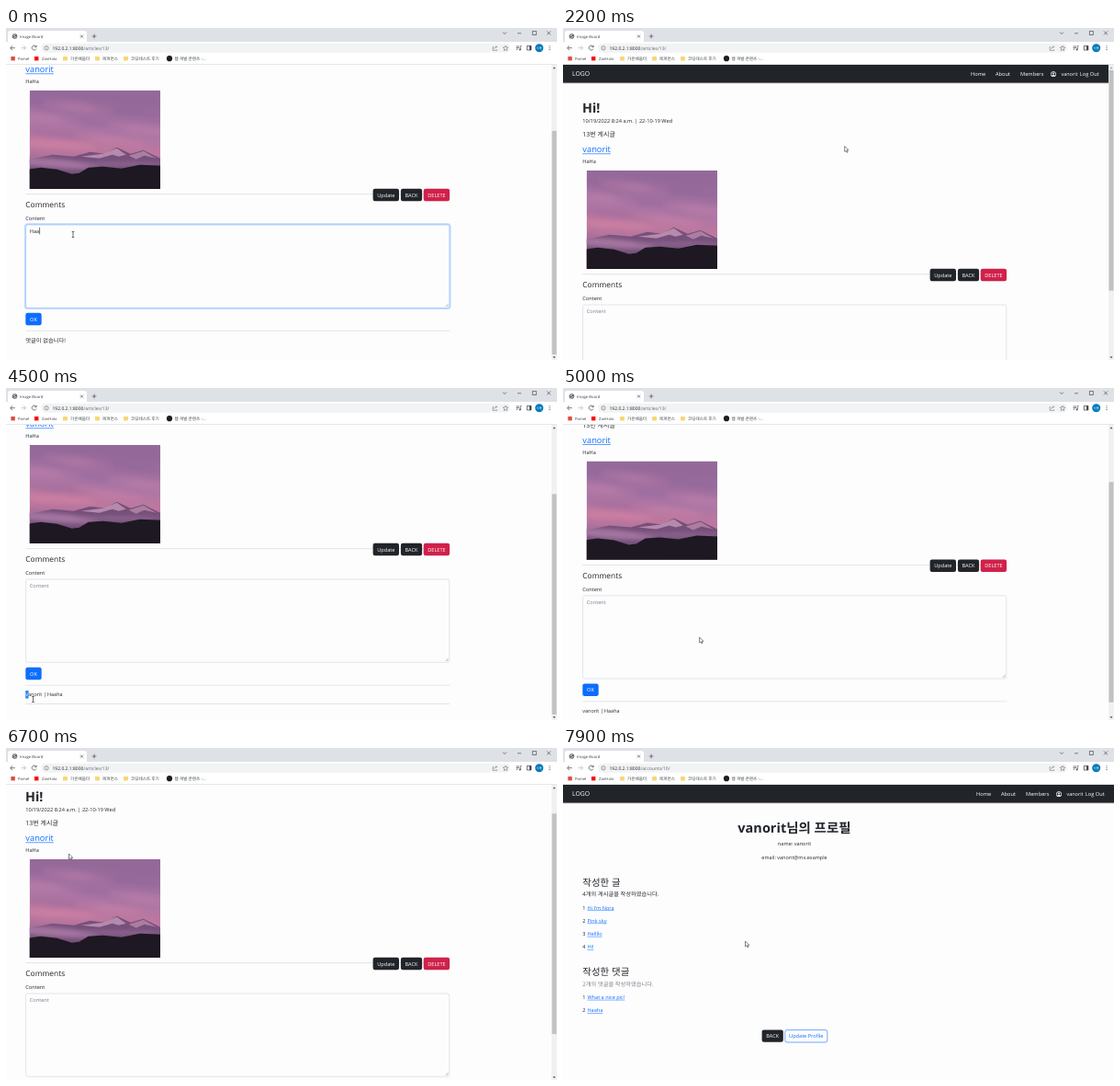
Write an HTML page with a canvas that moves like this. It is 600 by 361 pixels and loops after 8 s.

```html
<!DOCTYPE html>
<html lang="ko">
<head>
<meta charset="utf-8">
<title>Image Board</title>
<style>
  html, body { margin: 0; width: 100%; height: 100%; overflow: hidden; background: #fdfdfe; }
  canvas { display: block; width: 600px; height: 361px; }
</style>
</head>
<body>
<canvas id="stage"></canvas>
<script>
const LOOP = 8000, STEP = 100, TOP = 40, BOTTOM = 361;
const USER = 'vanorit', HOST = '192.0.2.1:8000';
const INK = '#212529', BLUE = '#0d6efd', RED = '#d0214a', RULE = '#d9dadc', GREY = '#5f6368';
const FONT = '"Open Sans", "Noto Sans CJK KR", "Noto Sans CJK", sans-serif';

const canvas = document.getElementById('stage');
const c = canvas.getContext('2d');
const ratio = window.devicePixelRatio || 1;
canvas.width = 600 * ratio;
canvas.height = 361 * ratio;

// Keys: time, then the values that hold at that time
const MOUSE = [
  [0, 73, 224.5], [800, 73, 224.5], [1400, 30, 316], [1700, 30, 316], [2200, 306.7, 128.5],
  [2400, 306.7, 128.5], [2800, 275.5, 296], [3400, 275.5, 296], [4300, 22, 334], [4500, 29.5, 338.5],
  [4700, 29.5, 338.5], [5200, 228, 226], [5500, 218, 205], [5700, 218, 205], [6700, 68.5, 115],
  [7000, 42, 131], [7500, 38, 131], [7900, 198.5, 210]
];
const SCROLL = [
  [0, 87], [1700, 87], [1800, 0], [2300, 0], [2500, 37], [2800, 93], [4800, 93], [5200, 57.5],
  [6400, 57.5], [6700, 34], [7000, 0]
];
const POINTER = [[0, 'beam'], [1200, 'arrow'], [1300, 'hand'], [1800, 'arrow'], [2600, 'beam'],
  [4800, 'arrow'], [7000, 'hand'], [7600, 'arrow']];

function at(keys, t) {
  const i = keys.findIndex(k => k[0] > t);
  if (i < 0) return keys[keys.length - 1].slice(1);
  const [a, b] = [keys[i - 1], keys[i]];
  const p = (t - a[0]) / (b[0] - a[0]);
  return a.slice(1).map((v, n) => v + (b[n + 1] - v) * p);
}
const latest = (keys, t) => keys.filter(k => k[0] <= t).pop()[1];

function rect(x, y, w, h, fill) {
  c.fillStyle = fill;
  c.fillRect(x, y, w, h);
}
function box(x, y, w, h, r, fill, stroke, width = 0.6) {
  c.beginPath();
  c.roundRect(x, y, w, h, r);
  if (fill) { c.fillStyle = fill; c.fill(); }
  if (stroke) { c.strokeStyle = stroke; c.lineWidth = width; c.stroke(); }
}
function disc(x, y, r, fill) {
  c.beginPath();
  c.arc(x, y, r, 0, 7);
  c.fillStyle = fill;
  c.fill();
}
function ellipse(x, y, rx, ry, angle, fill) {
  c.beginPath();
  c.ellipse(x, y, rx, ry, angle, 0, 7);
  c.fillStyle = fill;
  c.fill();
}
function shape(points, fill) {
  c.beginPath();
  points.forEach(([x, y]) => c.lineTo(x, y));
  c.closePath();
  c.fillStyle = fill;
  c.fill();
}
function path(d, color, width = 0.8, x = 0, y = 0, fill) {
  c.save();
  c.translate(x, y);
  const p = new Path2D(d);
  if (fill) { c.fillStyle = fill; c.fill(p); }
  c.strokeStyle = color;
  c.lineWidth = width;
  c.stroke(p);
  c.restore();
}
// Text is laid out large and scaled down, so tiny glyphs keep exact spacing
function text(s, x, y, size = 5.7, color = INK, { weight = 400, align = 'left' } = {}) {
  const zoom = 10;
  c.save();
  c.translate(x, y);
  c.scale(1 / zoom, 1 / zoom);
  c.font = `${weight} ${size * zoom}px ${FONT}`;
  c.textRendering = 'geometricPrecision';
  c.textAlign = align;
  c.fillStyle = color;
  c.fillText(s, 0, 0);
  const width = c.measureText(s).width / zoom;
  c.restore();
  return width;
}
function link(s, x, y, size) {
  const w = text(s, x, y, size, BLUE);
  rect(x, y + size * 0.14, w, Math.max(0.5, size / 14), BLUE);
}
function button(label, x, y, w, fill, color = '#fff', border) {
  box(x, y, w, 13.4, 2.2, fill, border);
  text(label, x + w / 2, y + 8.7, 5.6, color, { align: 'center' });
}

function browser(t) {
  const loading = t >= 1600 && t < 1800;
  rect(0, 0, 600, 15, '#dee1e6');
  rect(0, 15, 600, 24, '#fff');
  rect(0, 39, 600, 0.8, '#dfe1e4');
  box(2, 3, 86, 14, [3, 3, 0, 0], '#fff');
  if (loading) {
    c.beginPath();
    c.arc(9.5, 9, 2.5, t / 90, t / 90 + 4);
    c.strokeStyle = '#1a73e8';
    c.lineWidth = 0.8;
    c.stroke();
  } else {
    disc(9.5, 9, 2.8, GREY);
    path('M-2 -1Q0 0 .5 -2M-1 2Q0 0 2 .8', '#fff', 0.8, 9.5, 9);
  }
  text('Image Board', 15, 10.7, 4.25, '#3c4043');
  path('M81 7.6l3 3m0 -3l-3 3M93.8 9h4.6m-2.3 -2.3v4.6', '#45494d', 0.7);
  path('M541 4.5l2 2l2 -2M557 5.8h4M573.4 3.5h4v4h-4zM589 3.5l4 4m0 -4l-4 4', '#333', 0.6);

  path('M9.8 21.7h-5m2.3 -2.4l-2.4 2.4l2.4 2.4', '#55595e');
  path('M16.5 21.7h5m-2.3 -2.4l2.4 2.4l-2.4 2.4', '#b9bcc0');
  path('M32.8 20.2A2.5 2.5 0 1 0 33 22.6M33.2 18.8v1.9h-1.9', '#55595e');
  box(38, 16.8, 511, 10, 5, '#f1f3f4');
  path('M46.2 21.8a2.2 2.2 0 1 0 -4.4 0a2.2 2.2 0 1 0 4.4 0M44 21.5v1.4M44 20.3v.6', GREY, 0.55);
  const w = text(HOST, 50.5, 23.5, 5, '#202124');
  text(t < 7600 ? '/articles/13/' : '/accounts/10/', 50.5 + w, 23.5, 5, GREY);
  path('M531 20.5h-.8v3.8h4.5v-1M531.8 22.5q.3 -2 2.7 -2m-1 -1.2l1.2 1.2l-1.2 1.2', GREY, 0.55);
  path('M544 19.2l.8 1.8l2 .2l-1.5 1.3l.4 2l-1.7 -1l-1.7 1l.4 -2l-1.5 -1.3l2 -.2z', GREY, 0.55);
  path('M555.5 20h3.5m-3.5 1.6h3.5m-3.5 1.6h2M560.3 23.5v-4h1.2', '#45494d', 0.7);
  disc(559.7, 23.5, 0.9, '#45494d');
  path('M567.3 19.4h4.6v4.6h-4.6z', '#45494d', 0.8);
  rect(570, 19.4, 2, 4.6, '#45494d');
  disc(580.7, 21.7, 4.5, '#087bbd');
  text('사용', 580.7, 22.9, 3.2, '#fff', { align: 'center' });
  [19.8, 21.7, 23.6].forEach(y => disc(592, y, 0.55, '#45494d'));

  rect(5.4, 31, 4.4, 4.4, '#e04a3c');
  text('Pomel', 13, 34.7, 4.2, '#3c4043');
  rect(31, 31, 4.4, 4.4, '#f00');
  text('ZanHolo', 39, 34.7, 4.2, '#3c4043');
  [['가온배움터', 62], ['레퍼런스', 97], ['코딩테스트 후기', 128]].forEach(([name, x]) => {
    box(x, 31, 5, 4.4, 0.6, '#f7d774');
    text(name, x + 8, 34.8, 4.6, '#3c4043');
  });
  disc(178, 33.2, 3.1, '#1d1d1f');
  text('웹 개발 콘텐츠 -...', 183.5, 34.8, 4.6, '#3c4043');
}

function navbar(width) {
  const shift = width - 594;
  rect(0, 40, width, 19.8, INK);
  rect(0, 59.8, width, 1, '#e3e4e5');
  text('LOGO', 10, 52.4, 6.9, '#fff');
  [['Home', 444], ['About', 471], ['Members', 498], ['Log Out', 562.8]]
    .forEach(([s, x]) => text(s, x + shift, 52, 5.7, '#fff'));
  text(USER, 542.4 + shift, 52, 5.5, '#fff');
  disc(534 + shift, 50.2, 2.9, '#fff');
  disc(534 + shift, 50.2, 2.3, INK);
  disc(534 + shift, 49.6, 1, '#fff');
  box(532.4 + shift, 51, 3.2, 1.4, 0.7, '#fff');
}

function duskPhoto(x, y, w, h) {
  c.save();
  c.beginPath();
  c.rect(x, y, w, h);
  c.clip();
  c.translate(x, y);
  const sky = c.createLinearGradient(0, 0, -12, h);
  [[0, '#94699a'], [0.3, '#ab76a5'], [0.5, '#bd789f'], [0.62, '#b5749c'], [0.76, '#93638f'], [1, '#5b4166']]
    .forEach(([p, color]) => sky.addColorStop(p, color));
  rect(0, 0, w, h, sky);
  c.filter = 'blur(3px)';
  for (let i = 0; i < 8; i++) {
    ellipse((i * 53) % w, 12 + i * 6, 40, 4, 0.12, i % 2 ? 'rgba(214,138,176,.3)' : 'rgba(125,88,146,.22)');
  }
  ellipse(28, 59, 45, 4, 0.05, 'rgba(216,134,166,.6)');
  c.filter = 'blur(.7px)';
  shape([[0, 75], [25, 70], [48, 72], [66, 67], [82, 69], [95, 62], [110, 69], [124, 65], [w, 74], [w, 92], [0, 92]], '#76507a');
  shape([[56, 72], [80, 69], [95, 63], [105, 70], [97, 72], [90, 70], [76, 74]], '#b58aab');
  shape([[108, 71], [124, 66], [138, 74], [125, 71], [116, 75]], '#ab7ea0');
  c.filter = 'blur(2px)';
  ellipse(24, 79, 50, 5, 0.08, '#a2749f');
  ellipse(100, 80, 46, 2.5, 0, '#8b638f');
  c.filter = 'blur(.5px)';
  shape([[-2, 86], [12, 84], [30, 86], [46, 91], [54, 90], [64, 84], [80, 83], [100, 85], [120, 81], [w + 2, 82],
    [w + 2, h + 2], [-2, h + 2]], '#1d1822');
  c.restore();
}

function article(t) {
  const posted = t >= 1800;
  const [scroll] = at(SCROLL, t);
  c.save();
  c.translate(0, -scroll);
  navbar(594);
  text('Hi!', 21, 92, 14.3, INK, { weight: 700 });
  text('10/19/2022 8:24 a.m. | 22-10-19 Wed', 21.3, 103.2, 5.65);
  text('13번 게시글', 21.3, 117.8, 7);
  link(USER, 21.3, 135.2, 9.3);
  text('HaHa', 21.3, 146.9, 5.6);
  duskPhoto(25.7, 154.8, 142.3, 107.2);

  rect(21.3, 267.4, 462, 0.7, RULE);
  button('Update', 399.6, 261.8, 28.4, INK);
  button('BACK', 429.9, 261.8, 23.2, INK);
  button('DELETE', 454.7, 261.8, 28.4, RED);

  text('Comments', 21.3, 282.2, 8.4);
  text('Content', 21.3, 296, 5.6);
  const focused = t < 1500;
  if (focused) box(20.7, 300.2, 463, 92, 3, null, '#c2dbfe', 1.7);
  box(21.6, 301, 461.2, 90.3, 2.2, '#fdfdfe', focused ? '#86b7fe' : '#ced4da');
  path('M478.5 390l3 -3m-1.4 3l1.4 -1.4', '#888', 0.5);
  if (posted) {
    text('Content', 25.8, 309.8, 5.6, '#7a8188');
  } else {
    const w = text('Haaha'.slice(0, t < 100 ? 3 : t < 400 ? 4 : 5), 25.8, 309.8, 5.6);
    if (focused && (t < 900 || t >= 1400)) rect(26.1 + w, 303.8, 0.6, 7.6, '#222');
  }
  button('OK', 21.3, 396.8, 17.4, t >= 1400 && t < 1800 ? '#0b5ed7' : BLUE);
  rect(21.3, 415.8, 462, 0.7, RULE);
  if (posted) {
    text(`${USER} | Haaha`, 21.3, 428.4, 5.45);
    rect(21.3, 436.3, 462, 0.7, RULE);
    if (t >= 4400 && t < 4800) {
      rect(21.2, 422, 3.4, 8.6, '#2f8cf0');
      text(USER[0], 21.3, 428.4, 5.45, '#fff');
    }
  } else {
    text('댓글이 없습니다!', 21.3, 428.6, 6.25);
  }
  c.restore();
  scrollbar(scroll, posted ? 414 : 408);
}

function scrollbar(scroll, pageHeight) {
  const track = 309;
  rect(594, TOP, 6, BOTTOM - TOP, '#f1f1f1');
  rect(594.5, 46 + scroll * track / pageHeight, 5, track * (BOTTOM - TOP) / pageHeight, '#c1c1c1');
  shape([[595.5, 44.2], [597, 42.3], [598.5, 44.2]], scroll ? '#505050' : '#a3a3a3');
  shape([[595.5, 357.3], [597, 359.2], [598.5, 357.3]], '#505050');
}

function profile() {
  const middle = { align: 'center' };
  navbar(600);
  text(`${USER}님의 프로필`, 252, 92, 14.5, INK, { weight: 700, ...middle });
  text(`name: ${USER}`, 252, 106.4, 5.6, INK, middle);
  text(`email: ${USER}@mx.example`, 252, 120.7, 5.5, INK, middle);
  const list = (items, y) => items.forEach((s, i) => {
    text(i + 1, 21.3, y + i * 14.3, 5.6);
    link(s, 26.4, y + i * 14.3, 5.6);
  });
  text('작성한 글', 21.3, 149.8, 10.5);
  text('4개의 게시글을 작성하였습니다.', 21.3, 161.4, 6.25);
  list(["Hi I'm Nora", 'Pink sky', 'Hellllo', 'Hi!'], 175.5);
  text('작성한 댓글', 21.3, 247.4, 10.5);
  text('2개의 댓글을 작성하였습니다.', 21.3, 258.9, 6.25, '#7b8187');
  list(['What a nice pic!', 'Haaha'], 273);
  button('BACK', 216.6, 306.4, 23.2, INK);
  button('Update Profile', 241.8, 306.6, 46, null, BLUE, BLUE);
}

function pointer(t) {
  const [x, y] = at(MOUSE, t);
  const kind = latest(POINTER, t);
  if (kind === 'beam') {
    path('M-1.3 -3h2.6M0 -3v6M-1.3 3h2.6', '#333', 0.7, x, y);
  } else if (kind === 'arrow') {
    path('M0 0v6l1.4 -1.2l1 2.1l1 -.5l-.9 -2h1.8z', '#333', 0.6, x, y, '#fff');
  } else {
    path('M-.7 0q.7 -.8 1.4 0v2.4l2.6 .7v2.2l-.8 1.9h-3.2l-2 -2.7l.5 -.7l1.5 .8z', '#333', 0.6, x, y, '#fff');
  }
}

function draw() {
  const t = Math.floor(performance.now() % LOOP / STEP) * STEP;
  c.setTransform(ratio, 0, 0, ratio, 0, 0);
  rect(0, 0, 600, BOTTOM, '#fdfdfe');
  c.save();
  c.beginPath();
  c.rect(0, TOP, 600, BOTTOM - TOP);
  c.clip();
  if (t < 7600) article(t);
  else profile();
  c.restore();
  browser(t);
  pointer(t);
  requestAnimationFrame(draw);
}
draw();
</script>
</body>
</html>
```
